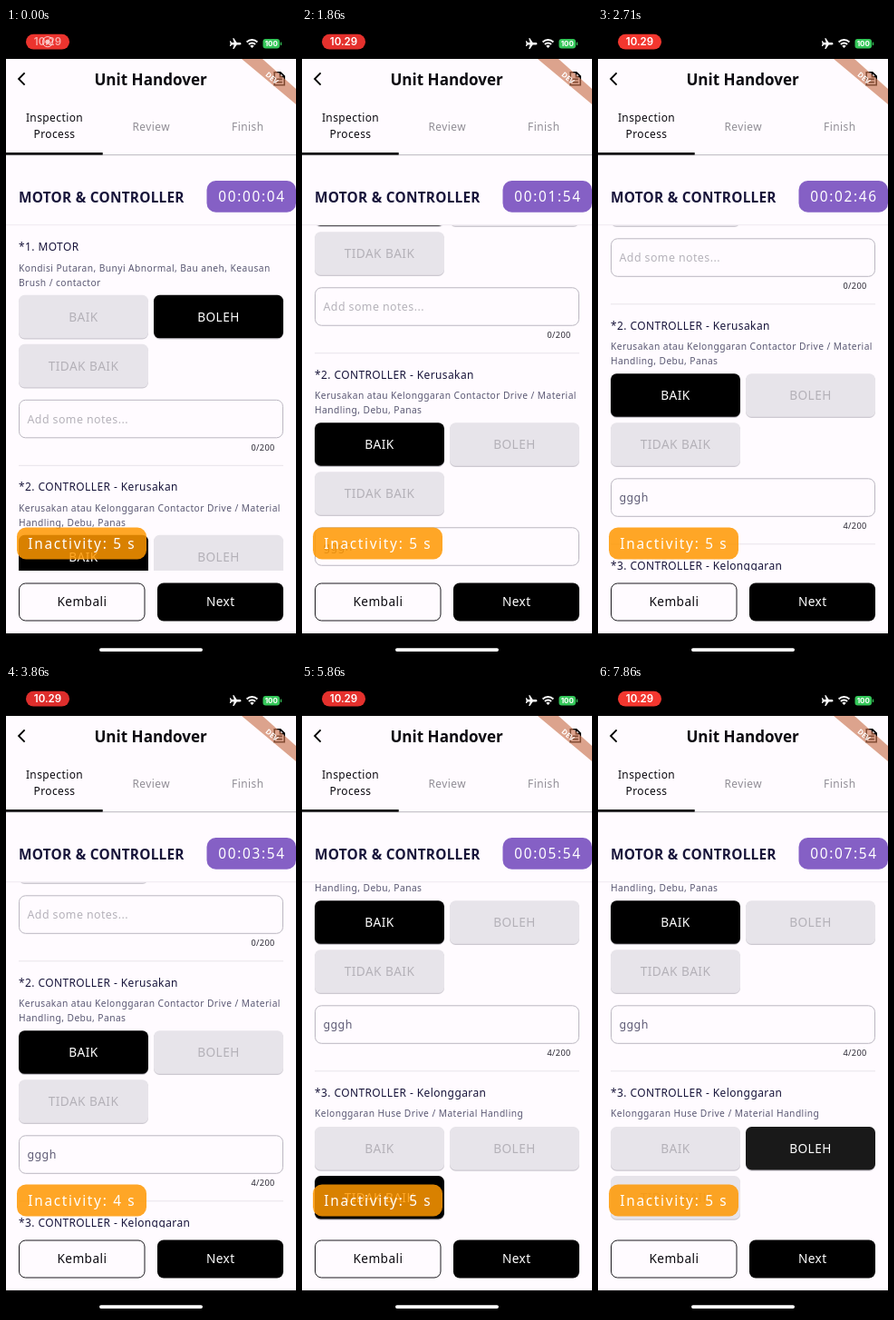
These frames come from a looping animation (320x692 px, 8 s). An HTML page:

```html
<!DOCTYPE html>
<html lang="id">
<head>
<meta charset="utf-8">
<title>Unit Handover</title>
<style>
  html, body { margin: 0; width: 100%; height: 100%; overflow: hidden; background: #000; }
  svg { display: block; width: 100%; height: 100%; }
  text { font-family: "Noto Sans", "Open Sans", sans-serif; font-size: 11.95px; letter-spacing: .427px; white-space: pre; }
  .mid { text-anchor: middle; }
  .item { fill: #17143a; }
  .desc { font-size: 10.24px; fill: #5a5873; }
  .btn { font-size: 13.65px; text-anchor: middle; }
  .note { font-size: 12.4px; }
  .count { font-size: 9.2px; letter-spacing: .34px; fill: #2a2833; }
  .badge { font-size: 15.36px; letter-spacing: 1.7px; font-weight: 500; fill: #fff; }
  .clock { font: 600 11.5px Inter, Roboto, sans-serif; letter-spacing: 0; fill: #fff; }
</style>
</head>
<body>
<svg id="stage" viewBox="0 0 320 692" xmlns="http://www.w3.org/2000/svg"></svg>
<script>
const NS = 'http://www.w3.org/2000/svg';
const stage = document.getElementById('stage');

function add(parent, tag, attrs = {}, text) {
  const el = document.createElementNS(NS, tag);
  for (const key in attrs) el.setAttribute(key, attrs[key]);
  if (text !== undefined) el.textContent = text;
  return parent.appendChild(el);
}
const box = (parent, x, y, width, height, fill, rx = 0, more = {}) =>
  add(parent, 'rect', { x, y, width, height, fill, rx, ...more });
const label = (parent, x, y, text, cls, more = {}) =>
  add(parent, 'text', { x, y, class: cls, ...more }, text);
const path = (parent, d, more = {}) => add(parent, 'path', { d, fill: 'none', ...more });

const defs = add(stage, 'defs');
box(add(defs, 'clipPath', { id: 'view' }), 0, 217, 320, 380);

box(stage, 0, 0, 320, 692, '#000');
box(stage, 0, 34, 320, 632, '#fffbff');

// Scrolling form
const list = add(add(stage, 'g', { 'clip-path': 'url(#view)' }), 'g');
const BTN = { w: 143, h: 47.5 };

function choice(x, y, name) {
  const id = 'c' + x + '_' + Math.round(y);
  box(list, x, y + 1.2, BTN.w, BTN.h, '#cdc9d1', 6.5);
  const face = box(list, x, y, BTN.w, BTN.h, '#000', 6.5);
  box(add(defs, 'clipPath', { id }), x, y, BTN.w, BTN.h, '#000', 6.5);
  const ink = add(add(list, 'g', { 'clip-path': `url(#${id})` }), 'circle', { fill: '#fff', opacity: 0 });
  const text = label(list, x + BTN.w / 2, y + 28.9, name, 'btn');
  return {
    ink,
    select(on) {
      face.setAttribute('fill', on ? '#000' : '#e7e4ea');
      text.setAttribute('fill', on ? '#fff' : '#b4b1b8');
    }
  };
}

function question(y, title, lines, note) {
  label(list, 14, y, title, 'item');
  lines.forEach((line, i) => label(list, 14, y + 22.7 + i * 15.6, line, 'desc'));
  const top = y + 33.3 + lines.length * 15.6 - (lines.length > 1 ? 15.6 : 15.6);
  const by = lines.length > 1 ? y + 48.6 : top;
  const choices = [
    choice(14, by, 'BAIK'),
    choice(163, by, 'BOLEH'),
    choice(14, by + 54, 'TIDAK BAIK')
  ];
  box(list, 14.5, by + 115.5, 291, 41.5, 'none', 7, { stroke: '#bbb7c1' });
  label(list, 23.5, by + 141, note || 'Add some notes...', 'note', { fill: note ? '#5f5c76' : '#b5b2ba' });
  label(list, 270.5, by + 170.7, note.length + '/200', 'count');
  box(list, 14, by + 187, 292, 1, '#e8e3ea');
  return choices;
}

const motor = question(245.2, '*1. MOTOR',
  ['Kondisi Putaran, Bunyi Abnormal, Bau aneh, Keausan', 'Brush / contactor'], '');
const damage = question(509.2, '*2. CONTROLLER - Kerusakan',
  ['Kerusakan atau Kelonggaran Contactor Drive / Material', 'Handling, Debu, Panas'], 'gggh');
const loose = question(773.2, '*3. CONTROLLER - Kelonggaran',
  ['Kelonggaran Huse Drive / Material Handling'], '');

const pick = (choices, index) => choices.forEach((c, i) => c.select(i === index));
pick(damage, 0);

// Status bar
const pill = box(stage, 22, 6.8, 48, 16.8, '#ff3b30', 8.4);
const clock = label(stage, 46, 19.2, '10.29', 'clock mid');
const rec = add(stage, 'g', { stroke: '#fff', opacity: .75 });
add(rec, 'circle', { cx: 46, cy: 15.2, r: 5.6, fill: 'none' });
add(rec, 'circle', { cx: 46, cy: 15.2, r: 2.2, fill: '#fff' });
path(stage, 'M259.5 17.2c0-.9-1-1.3-2-1.3h-2.8l-3.2-4.6h-1.3l1.5 4.6h-2.6l-1.2-1.6h-1l.7 2.9-.7 2.9h1l1.2-1.6h2.6l-1.5 4.6h1.3l3.2-4.6h2.8c1 0 2-.4 2-1.3z', { fill: '#fff' });
path(stage, 'M265.6 15.4a8.6 8.6 0 0 1 11.8 0M267.9 18a5.3 5.3 0 0 1 7.2 0', { stroke: '#fff', 'stroke-width': 2 });
path(stage, 'M269.3 19.8a3.2 3.2 0 0 1 4.4 0l-2.2 2.3z', { fill: '#fff' });
box(stage, 283.5, 12, 18.5, 10.5, '#34c759', 3);
box(stage, 302.8, 15.4, 1.3, 3.6, '#34c759', .6);
label(stage, 292.8, 20.2, '100', 'mid', { fill: '#fff', style: 'font:700 8px Inter,sans-serif;letter-spacing:0' });

// App bar
path(stage, 'M20.6 49.4L14 56l6.6 6.6', { stroke: '#000', 'stroke-width': 1.8 });
label(stage, 159.6, 63.2, 'Unit Handover', 'mid', { fill: '#0c0a10', style: 'font-size:17.07px;font-weight:600;letter-spacing:0' });
path(stage, 'M296.2 48.8h6.6l4.4 4.4v9.6h-11zM302.4 49v4.6h4.6M298.6 56.4h6.2M298.6 59.6h6.2', { stroke: '#000', 'stroke-width': 1.6 });
path(stage, 'M260 34H283L320 67V84z', { fill: 'rgba(201,117,81,.65)' });
label(stage, 0, 2.8, 'DEV', 'mid', { fill: '#fff', transform: 'translate(293.5 55) rotate(41)', style: 'font-size:8px;font-weight:700;letter-spacing:0' });

// Tabs
label(stage, 53.5, 103.4, 'Inspection', 'mid', { fill: '#0c0a10' });
label(stage, 53.5, 121.2, 'Process', 'mid', { fill: '#0c0a10' });
label(stage, 160.2, 113.4, 'Review', 'mid', { fill: '#918e96' });
label(stage, 266.8, 113.4, 'Finish', 'mid', { fill: '#918e96' });
box(stage, 0, 139, 320, 1.2, '#c6c3c9');
box(stage, 0, 137, 106.7, 2.6, '#000');

// Section heading
label(stage, 14, 191.6, 'MOTOR & CONTROLLER', '', { fill: '#17143a', style: 'font-size:15.36px;font-weight:600;letter-spacing:.25px' });
box(stage, 0, 216.2, 320, 1, '#efeaf1');
box(stage, 221.5, 168, 98.5, 34.8, 'rgba(103,58,183,.8)', 10);
const timer = label(stage, 234.3, 191, '', 'badge');

// Bottom bar
box(stage, 14.5, 611, 138.5, 41, '#fffbff', 7, { stroke: '#1b191e' });
label(stage, 83.9, 636.2, 'Kembali', 'btn', { fill: '#0c0a10' });
box(stage, 167, 610.5, 139, 42, '#000', 7);
label(stage, 236.7, 636.2, 'Next', 'btn', { fill: '#fff' });
box(stage, 103, 682.2, 114, 3.8, '#fff', 1.9);

box(stage, 12, 549.5, 143, 35, 'rgba(255,152,0,.85)', 10);
const idle = label(stage, 24.3, 572.6, '', 'badge');

// Motion
const LOOP = 8000, FPS = 7;
const clamp = v => Math.min(1, Math.max(0, v));
const glide = (t, start, span) => 1 - (1 - clamp((t - start) / span)) ** 3;
const pad = n => String(n).padStart(2, '0');
const TAP = [1, 7.43], PRESS = .14;

function ripple(ink, age, cx, cy) {
  const on = age >= 0 && age < .75;
  ink.setAttribute('cx', cx);
  ink.setAttribute('cy', cy);
  ink.setAttribute('r', on ? 10 + 155 * age : 0);
  ink.setAttribute('opacity', on ? .1 * clamp((.75 - age) / .33) : 0);
}

function secondsLeft(t) {
  if (t >= TAP[1] + PRESS) return 5;
  if (t >= 7.1) return 3;
  if (t >= 6.1 || (t >= 3.1 && t < 3.93)) return 4;
  return 5;
}

function draw(ms) {
  const step = Math.floor((ms + 5) * FPS / 1000) % (LOOP * FPS / 1000);
  const t = step / FPS;

  const ticks = Math.floor(Math.max(4, t * 60 + 3.2));
  timer.textContent = `00:${pad(Math.floor(ticks / 60))}:${pad(ticks % 60)}`;
  idle.textContent = `Inactivity: ${secondsLeft(t)} s`;

  const scroll = 177.5 * glide(t, 1.464, 1.2) + 143 * glide(t, 3.93, .9);
  list.setAttribute('transform', `translate(0 ${-scroll.toFixed(2)})`);

  pick(motor, t < TAP[0] + PRESS ? 1 : 0);
  pick(loose, t < TAP[1] + PRESS ? 2 : 1);
  ripple(motor[0].ink, t - TAP[0], 108, 312);
  ripple(loose[1].ink, t - TAP[1], 236, 830);

  const glow = .5 + .5 * Math.cos((t - 1.286) / 1.714 * 2 * Math.PI);
  pill.setAttribute('fill', `rgb(${222 + 28 * glow},${46 + 12 * glow},${44 + 4 * glow})`);
  clock.setAttribute('opacity', step ? 1 : .6);
  rec.setAttribute('visibility', step ? 'hidden' : 'visible');
}

const begin = performance.now();
function loop() {
  draw((performance.now() - begin) % LOOP);
  requestAnimationFrame(loop);
}
draw(0);
requestAnimationFrame(loop);
</script>
</body>
</html>
```
